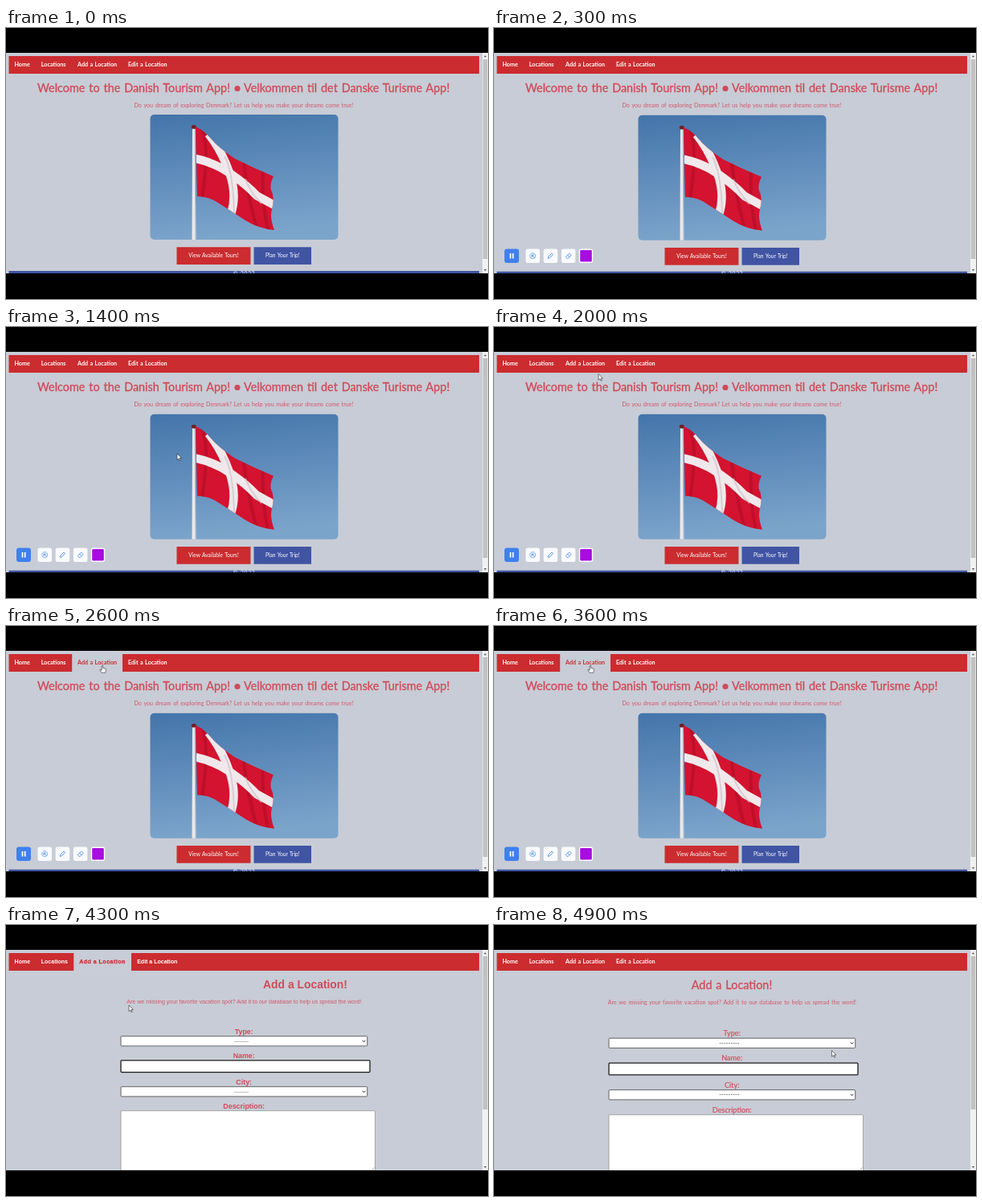
These frames come from a looping animation (600x338 px, 5000 ms). An HTML page:

```html
<!DOCTYPE html>
<html lang="en">
<head>
<meta charset="utf-8">
<title>Danish Tourism App</title>
<style>
  html, body { margin: 0; width: 100%; height: 100%; overflow: hidden; background: #000; }
  svg { display: block; width: 600px; height: 338px; font-family: Lato, sans-serif; word-spacing: .7px; }
  .mid { text-anchor: middle; }
  .nav { font-size: 7.2px; font-weight: 700; fill: #fff; }
  .nav .hot, .hot { fill: #cb2c2f; }
  .h1 { font-size: 14.4px; word-spacing: 1.2px; fill: #d04b59; stroke: #d04b59; stroke-width: .3px; }
  .p { font-size: 7.2px; fill: #d4566a; word-spacing: .8px; }
  .label { font-size: 9.15px; fill: #d04b59; stroke: #d04b59; stroke-width: .15px; }
  .btn { font-size: 6.6px; fill: #fff; }
  .plain { font-family: "Liberation Sans", Arial, sans-serif; word-spacing: 0; }
  .plain .nav { font-size: 7px; }
  .plain .h1 { font-size: 13.9px; font-weight: 700; word-spacing: 0; stroke: none; }
  .plain .p { font-size: 7.03px; word-spacing: 0; }
  .plain .label { font-size: 8.9px; font-weight: 700; stroke: none; }
  .plain .hot { letter-spacing: .5px; stroke: #cb2c2f; stroke-width: .25px; }
</style>
</head>
<body>
<svg viewBox="0 0 600 338">
  <defs>
    <clipPath id="view"><rect y="31" width="600" height="275"/></clipPath>
    <clipPath id="photo"><rect x="179.5" y="108" width="234" height="156" rx="5"/></clipPath>
    <path id="flag" d="M236 123Q247 128 255 138Q264 149 285 163Q309 175 333 185Q328 195 330 202Q335 211 331 226Q328 236 334 252Q314 250 298 240Q280 228 264 218Q252 210 238 210Z"/>
    <clipPath id="cloth"><use href="#flag"/></clipPath>
    <linearGradient id="sky" x1="0" y1="0" x2=".15" y2="1">
      <stop stop-color="#4374aa"/><stop offset="1" stop-color="#7ba4cb"/>
    </linearGradient>
  </defs>

  <g clip-path="url(#view)">
    <rect y="31" width="600" height="275" fill="#c8ccd6"/>
    <rect x="3.5" y="35" width="585.5" height="22" fill="#cb2c2f"/>

    <g id="home">
      <text class="h1" x="39" y="80">Welcome to the Danish Tourism App!</text>
      <circle cx="288" cy="75.5" r="3.6" fill="#d04b59"/>
      <text class="h1" x="296" y="80">Velkommen til det Danske Turisme App!</text>
      <text class="p mid" x="296" y="99">Do you dream of exploring Denmark? Let us help you make your dreams come true!</text>
      <g id="content">
        <g clip-path="url(#photo)">
          <rect x="179" y="107" width="235" height="158" fill="url(#sky)"/>
          <path d="M232 125H235.5L236.3 265H231.5Z" fill="#e9e8ea"/>
          <path d="M235 126L236 265" stroke="#b9bfca" fill="none"/>
          <ellipse cx="233.8" cy="123.5" rx="3" ry="2.4" fill="#6d2028"/>
          <use href="#flag" fill="#d3132f"/>
          <g clip-path="url(#cloth)" fill="none">
            <path d="M244 125Q254 150 244 212M296 168Q300 205 312 250M320 178Q318 215 326 252" stroke="#ad0c26" stroke-width="4" opacity=".55"/>
            <path d="M236 163Q260 168 280 182T312 209L334 221M252 132Q268 152 278 180T280 232" stroke="#f0e8ea" stroke-width="10.5"/>
            <path d="M272 160Q283 180 284 232M298 188Q304 205 318 219" stroke="#c9bcc6" stroke-width="2" opacity=".6"/>
          </g>
        </g>
        <rect x="212.5" y="273.3" width="92" height="21.7" fill="#cb2c2f"/>
        <rect x="308.5" y="273.3" width="71.5" height="21.7" fill="#4054a3"/>
        <g class="btn mid">
          <text x="258.5" y="286.4">View Available Tours!</text>
          <text x="344.3" y="286.4">Plan Your Trip!</text>
        </g>
        <rect x="3.5" y="303" width="585.5" height="8" fill="#4054a3"/>
        <text class="btn mid" x="296.5" y="308.6" letter-spacing=".7">© 2022</text>
      </g>
    </g>

    <g id="forms"></g>
    <g id="navs"></g>

    <g id="toolbar" fill="none" stroke="#4b8ee8" stroke-width=".9">
      <rect x="13" y="275.5" width="18" height="17.5" rx="3" fill="#3f80ee" stroke="none"/>
      <path d="M20.5 281V287.5M23.7 281V287.5" stroke="#fff" stroke-width="1.7"/>
      <g fill="#f8fafd" stroke="none">
        <rect x="39.5" y="275.5" width="17.5" height="17.5" rx="2.5"/>
        <rect x="61.7" y="275.5" width="17.5" height="17.5" rx="2.5"/>
        <rect x="83.9" y="275.5" width="17.5" height="17.5" rx="2.5"/>
      </g>
      <circle cx="48.2" cy="284.2" r="3.5" stroke-dasharray="2 .7"/>
      <path d="M47 283L51 287M47 283V286M47 283H50M67.2 287.3L67.8 285.2L72 281L73.5 282.5L69.3 286.7ZM89.3 285.5L93.8 281L96.2 283.4L91.7 287.9ZM91.5 283.3L94 285.7"/>
      <rect x="106.5" y="276.2" width="16" height="16" rx="2" fill="#a80ce0" stroke="#fff" stroke-width="1.4"/>
    </g>

    <rect x="593" y="31" width="7" height="275" fill="#f1f1f1"/>
    <rect id="thumb" x="593.7" y="39" width="5.6" height="249" fill="#c1c1c1"/>
    <path d="M594.7 36.3L596.5 34.2L598.3 36.3Z M594.7 301L596.5 303.1L598.3 301Z" fill="#555"/>

    <path id="arrow" d="M0 0V7.6L1.8 6L3 8.7L4.2 8.2L3 5.5H5.4Z" fill="#fff" stroke="#222" stroke-width=".6"/>
    <path id="hand" d="M-.8 .6Q0 -.5 .8 .6V3.5L3.9 4.3Q4.6 4.6 4.4 5.6L3.7 9.3H-.8L-3.2 5.9Q-2.9 4.8 -1.9 5.4L-.8 6.3Z" fill="#fff" stroke="#222" stroke-width=".6"/>
  </g>
</svg>

<script>
const $ = id => document.getElementById(id);
const show = (id, on) => $(id).style.display = on ? '' : 'none';
const text = (cls, x, y, str) => `<text class="${cls}" x="${x}" y="${y}">${str}</text>`;
const box = (x, y, w, h, stroke, width) =>
  `<rect x="${x}" y="${y}" width="${w}" height="${h}" rx="1" fill="#fff" stroke="${stroke}" stroke-width="${width}"/>`;

const select = (y, dashSize) => box(143, y, 306.7, 12.2, '#555', .9) +
  `<text class="mid" x="293" y="${y + 8.3}" font-size="${dashSize}" fill="#333">---------</text>` +
  `<path d="M443.7 ${y + 5.2}l1.8 1.9l1.8 -1.9" fill="none" stroke="#222"/>`;

// Tops of: type select, name input, city select, description area.
function form(id, plain, titleX, titleY, paraY, labels, tops) {
  const names = ['Type:', 'Name:', 'City:', 'Description:'];
  const dash = plain ? 6 : 7.6;
  return `<g id="${id}" class="${plain ? 'plain' : ''}">` +
    text('h1 mid', titleX, titleY, 'Add a Location!') +
    text('p mid', 296.4, paraY, 'Are we missing your favorite vacation spot? Add it to our database to help us spread the word!') +
    names.map((name, i) => text('label mid', 296.2, labels[i], name)).join('') +
    select(tops[0], dash) + box(143, tops[1], 310, 14.7, '#1c1c1c', 1.3) + select(tops[2], dash) +
    box(143, tops[3], 316.5, plain ? 74.3 : 90, '#888', .7) +
    '<path d="M456 305l2.5 -2.5" stroke="#777" stroke-width=".6"/></g>';
}

function nav(id, plain, xs, hotX, hotWidth) {
  const items = ['Home', 'Locations', 'Add a Location', 'Edit a Location'];
  const hover = hotWidth ? `<rect x="${hotX}" y="34.7" width="${hotWidth}" height="22.6" fill="#c8ccd6"/>` : '';
  return `<g id="${id}" class="${plain ? 'plain' : ''}">${hover}<g class="nav">` +
    items.map((item, i) => text(hotWidth && i === 2 ? 'hot' : '', xs[i], plain && i === 2 ? 48.4 : 47.6, item)).join('') +
    '</g></g>';
}

$('forms').innerHTML =
  form('formPlain', true, 372.5, 79, 98.2, [136, 166.2, 199.2, 229.2], [138.7, 168.9, 201.7, 231.7]) +
  form('formStyled', false, 296, 80, 99.2, [138.3, 169.3, 203, 234], [141.2, 172.2, 205.7, 236.7]);
const navX = [10.4, 43.8, 89, 152];
$('navs').innerHTML = nav('navIdle', false, navX) + nav('navHot', false, navX, 82.2, 62.8) +
  nav('navPlain', true, [10.6, 43.8, 91.2, 163.2], 84.3, 71.7);

// Pointer path: time, x, y.
const path = [
  [1200, 236, 190], [1600, 190, 126], [2000, 130, 58.5], [2100, 123, 52],
  [2400, 120, 49], [4100, 120, 49], [4300, 153, 100], [4600, 300, 132], [4900, 420.5, 156.5]
];
function pointer(t) {
  const i = Math.max(1, path.findIndex(p => p[0] >= t));
  const [t0, x0, y0] = path[i - 1], [t1, x1, y1] = path[i];
  const k = (t - t0) / (t1 - t0);
  return [x0 + (x1 - x0) * k, y0 + (y1 - y0) * k];
}

function draw() {
  const t = Math.floor(performance.now() % 5000 / 100) * 100;
  const home = t < 3800, plain = !home && t < 4400, tools = home && t >= 300;
  const over = t >= 2100 && t < 4200;
  show('home', home);
  show('toolbar', tools);
  show('formPlain', plain);
  show('formStyled', !home && !plain);
  show('navHot', home && over);
  show('navPlain', plain);
  show('navIdle', !plain && !(home && over));
  $('content').setAttribute('transform', `translate(0 ${tools ? .7 : 0})`);
  $('thumb').setAttribute('height', home ? 249 : 191);
  show('arrow', t >= 1200 && !over);
  show('hand', over);
  if (t >= 1200) {
    const at = `translate(${pointer(t)})`;
    $('arrow').setAttribute('transform', at);
    $('hand').setAttribute('transform', at);
  }
  requestAnimationFrame(draw);
}
draw();
</script>
</body>
</html>
```
